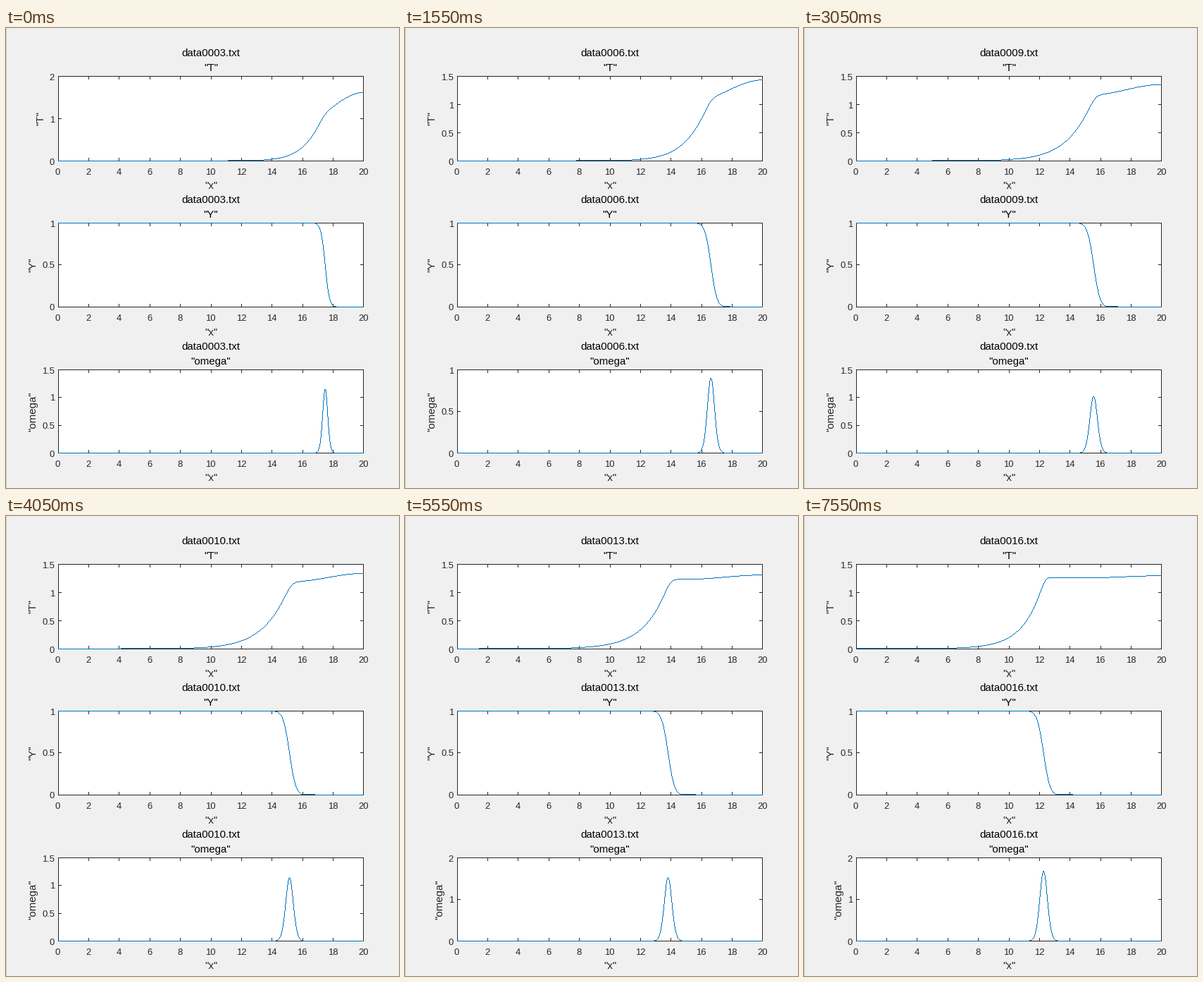
These frames come from a looping animation (558 by 652 pixels, 8000 ms). A matplotlib script:

```python
import numpy as np
import matplotlib.pyplot as plt
from matplotlib.animation import FuncAnimation
from matplotlib.collections import LineCollection
from matplotlib.patches import Rectangle

W, H, DPI = 558, 652, 64
PT = 72 / DPI                      # points per pixel
COL0, COL1 = 74, 507               # first and last pixel column of the axes
UNIT = (COL1 + 1 - COL0) / 20      # pixels per unit of x
LEFT, RIGHT = COL0 + .5, COL1 + .5
PANELS = [("T", 68.5, 188.5), ("Y", 276.5, 395.5), ("omega", 484.5, 602.5)]
BLUE, DARK = "#0072BD", "#262626"
TICK = 4.5
TICK_MS, LOOP_MS = 50, 8000
FIRST_STEP = 3

plt.rcParams["font.family"] = "Liberation Sans"
plt.rcParams["path.simplify"] = False
plt.rcParams["toolbar"] = "None"

cols = np.arange(COL0, COL1 + 1) + .5
x = np.arange(2 * len(cols) + 1) / 2 / UNIT    # column edges and centres

fig = plt.figure(figsize=(W / DPI, H / DPI), dpi=DPI, facecolor="#F0F0F0")
ax = fig.add_axes([0, 0, 1, 1])
ax.set_xlim(0, W)
ax.set_ylim(H, 0)
ax.axis("off")
ax.add_patch(Rectangle((0, 0), 1, H, fc="#C8C8B8", lw=0, aa=False))


def label(tx, ty, s, size=15, color=DARK, ha="center", **kw):
    return ax.text(tx, ty, s, fontsize=size * PT, color=color, ha=ha,
                   va="baseline", **kw)


def strokes(segments, cap="butt"):
    lines = LineCollection(segments, colors=DARK, linewidths=PT,
                           antialiaseds=False, capstyle=cap)
    lines.set_snap(False)
    ax.add_collection(lines, autolim=False)
    return lines


def pixel_line(y):
    """One-pixel line as a vertical run of whole pixels in each column."""
    edges, mid = y[::2], y[1::2]
    trio = np.array([edges[:-1], mid, edges[1:]])
    first = np.floor(trio.min(0) + .5)
    last = np.floor(trio.max(0) - .5)
    flat = last < first
    first = np.where(flat, np.floor(mid), first)
    last = np.where(flat, first, last)
    gap = np.full_like(cols, np.nan)
    return (np.column_stack([cols, cols, gap]).ravel(),
            np.column_stack([first + .05, last + .95, gap]).ravel())


class Panel:
    def __init__(self, name, top, bottom):
        self.top, self.bottom = top, bottom
        mid = (LEFT + RIGHT) / 2
        quoted = f'"{name}"'
        ax.add_patch(Rectangle((LEFT, top), RIGHT - LEFT, bottom - top,
                               fc="white", lw=0, aa=False))
        strokes([[(LEFT, top), (RIGHT, top)], [(LEFT, bottom), (RIGHT, bottom)],
                 [(LEFT, top), (LEFT, bottom)], [(RIGHT, top), (RIGHT, bottom)]],
                "projecting")
        xticks = []
        for v in range(0, 21, 2):
            tx = min(np.floor(COL0 + v * UNIT) + .5, RIGHT)
            xticks += [[(tx, top), (tx, top + TICK)],
                       [(tx, bottom), (tx, bottom - TICK)]]
            label(COL0 + v * UNIT - .5, bottom + 19.3, str(v), 13)
        strokes(xticks)
        self.yticks = strokes([])
        self.title = label(mid, top - 28.5, "", color="black")
        label(mid, top - 7.5, quoted, color="black")
        label(mid, bottom + 40, '"x"')
        self.ylabel = label(42, (top + bottom) / 2, quoted, rotation=90,
                            rotation_mode="anchor")
        self.ynums = [label(69, 0, "", 13, ha="right") for _ in range(4)]
        self.curve, = ax.plot([], [], color=BLUE, lw=.9 * PT, aa=False,
                              snap=False, solid_capstyle="butt")

    def set_limit(self, lim):
        self.scale = (self.bottom - self.top) / lim
        segments = []
        for text in self.ynums:
            text.set_text("")
        ticks = np.arange(0, lim + .01, 1 if lim == 2 else .5)
        for text, v in zip(self.ynums, ticks):
            row = np.floor(self.to_rows(v) - .01) + .5
            segments += [[(LEFT, row), (LEFT + TICK, row)],
                         [(RIGHT, row), (RIGHT - TICK, row)]]
            text.set_text(f"{v:g}")
            text.set_y(row + 5)
        self.yticks.set_segments(segments)
        self.ylabel.set_x(53 if lim == 2 else 42)

    def to_rows(self, values):
        return self.bottom - values * self.scale

    def draw(self, rows):
        self.curve.set_data(*pixel_line(rows))


panels = [Panel(*p) for p in PANELS]


def smoothstep(v):
    v = np.clip(v, 0, 1)
    return v * v * (3 - 2 * v)


def step_at(t):
    # Two steps per second, with every fifth slot left out.
    slots = (t - 50) // 500 + 1
    return FIRST_STEP + slots - (slots + 2) // 5


def flame_front(u):
    return 17.475 - .255 * u - .0112 * u * u


def wall_heat(u):
    return 1.28 + .33 * np.exp(-u / 3.8)


def peak_rate(u):
    return .89 + .79 * smoothstep((u - 3.7) / 8.8) + .26 * np.exp(-u)


def temperature(u, s):
    bowl = (u / 6.5 - 1) ** 2
    curve = .006 - .075 * np.exp(-u / 6)
    preheat = np.exp(.11 + .07 * bowl + (.61 + .18 * bowl) * s + curve * s * s)
    sag = .33 * np.exp(-u / 4.6)
    burnt = wall_heat(u) - sag * (1 - np.cos(np.pi * (20 - x) / (4 + .1 * u)))
    return (preheat ** -10 + burnt ** -10) ** -.1


def update(i):
    step = step_at(i * TICK_MS)
    u = step - FIRST_STEP
    front = flame_front(u)
    s = x - front
    width = .6 - .2 * np.exp(-u / 1.8)
    fuel = 1 / (1 + np.exp(2.9 / width * s * (1 + .25 * s * s)))
    rate = peak_rate(u) / np.cosh(s / width) ** 6
    onset = 10.2 - .88 * u + .9 * np.exp(-u / 2)
    fuel_end = front + 2.1 - 1.35 * np.exp(-u / 6)

    p_temp, p_fuel, p_rate = panels
    p_temp.set_limit(np.ceil(2 * wall_heat(u)) / 2)
    p_fuel.set_limit(1)
    p_rate.set_limit(np.ceil(2 * peak_rate(u)) / 2)

    # Any value above zero sits at least one row over the axis line.
    lifted = np.minimum(p_temp.bottom - 1, p_temp.to_rows(temperature(u, s)) - .5)
    p_temp.draw(np.where(x < onset, p_temp.bottom, lifted))
    lifted = np.minimum(p_fuel.bottom - 1, p_fuel.to_rows(fuel))
    p_fuel.draw(np.where(x > fuel_end, p_fuel.bottom, lifted))
    p_rate.draw(p_rate.to_rows(rate))

    for p in panels:
        p.title.set_text(f"data{step:04d}.txt")
    return []


anim = FuncAnimation(fig, update, frames=LOOP_MS // TICK_MS, interval=TICK_MS,
                     repeat=True, repeat_delay=0, blit=False)
plt.show()
```
